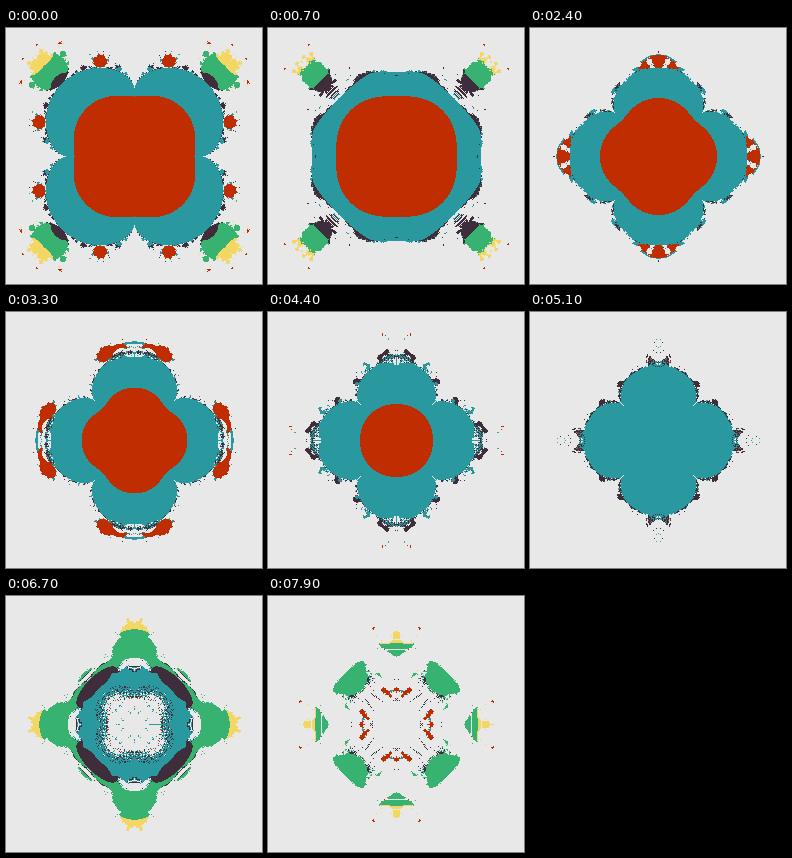
Recreate the animation shown at these times as an HTML page with a canvas. Size 256 px wide and 256 px high, loop 8 s.

```html
<!DOCTYPE html>
<html lang="en">
<head>
<meta charset="utf-8">
<title>Power-5 bulb, slice by slice</title>
<style>
  html, body { margin: 0; width: 100%; height: 100%; overflow: hidden; background: #e8e8e8; }
  canvas { display: block; width: 100%; height: 100%; image-rendering: pixelated; }
</style>
</head>
<body>
<canvas id="stage" width="256" height="256"></canvas>
<script>
const SIZE = 256, MID = 128, STEP = 100, SLICES = 80, ITERATIONS = 200;
const NUDGE = 1e-15; // keeps pixels off the exact mirror planes
const ctx = document.getElementById('stage').getContext('2d');

const rgb = (r, g, b) => (255 << 24 | b << 16 | g << 8 | r) >>> 0;
const OUTSIDE = rgb(232, 232, 232);
const BANDS = [
  rgb(192, 45, 0),
  rgb(42, 153, 159),
  rgb(64, 45, 60),
  rgb(56, 178, 113),
  rgb(244, 215, 98)
];

// Iterates p -> p^5 + c in spherical coordinates, written as polynomials;
// the colour comes from the squared length of the last point.
function colourAt(cx, cy, cz) {
  let x = cx, y = cy, z = cz;
  for (let i = 0; i < ITERATIONS; i++) {
    const xx = x * x, yy = y * y, zz = z * z, s = xx + yy;
    if (s + zz > 4) return OUTSIDE;
    const ss = s * s;
    const k = ss > 0 ? (5 * zz * zz - 10 * zz * s + ss) / ss : 0;
    const nx = x * (xx * xx - 10 * xx * yy + 5 * yy * yy);
    const ny = y * (5 * xx * xx - 10 * xx * yy + yy * yy);
    z = z * (zz * zz - 10 * zz * s + 5 * ss) + cz;
    x = nx * k + cx;
    y = ny * k + cy;
  }
  const d = x * x + y * y + z * z;
  return d > 4 ? OUTSIDE : BANDS[Math.min(4, Math.floor(d * 4))];
}

function renderSlice(h) {
  const image = new ImageData(SIZE, SIZE);
  const px = new Uint32Array(image.data.buffer).fill(OUTSIDE);
  const put = (x, y, c) => { px[(MID + y) * SIZE + MID + x] = c; };
  // One eighth is enough: the slice has the symmetry of a square.
  for (let a = 0; a < MID; a++) {
    for (let b = 0; b <= a; b++) {
      const c = colourAt(a / MID, b / MID + NUDGE, h);
      if (c === OUTSIDE) continue;
      for (const [u, v] of [[a, b], [b, a]]) {
        put(u, v, c);
        put(-u, v, c);
        put(u, -v, c);
        put(-u, -v, c);
      }
    }
  }
  // The positive x axis stays exactly in its plane.
  for (let a = 1; a < MID; a++) put(a, 0, colourAt(a / MID, 0, h));
  return image;
}

const slices = [];
let shown = -1;

function draw() {
  const n = Math.floor(performance.now() % (STEP * SLICES) / STEP);
  if (n !== shown) {
    slices[n] ||= renderSlice(n / 100);
    ctx.putImageData(slices[n], 0, 0);
    shown = n;
  }
  requestAnimationFrame(draw);
}
draw();
</script>
</body>
</html>
```
